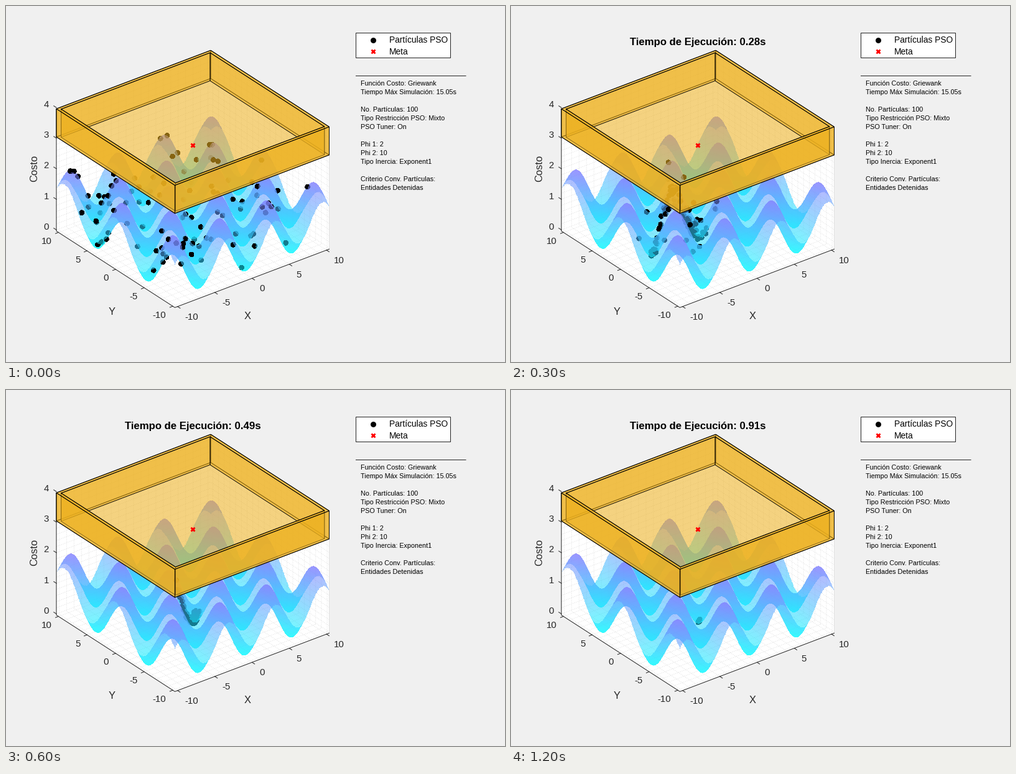
A matplotlib script that plays this animation: 802x573 px, repeating every 1300 ms.

```python
import numpy as np
import matplotlib.pyplot as plt
from matplotlib.animation import FuncAnimation
from matplotlib.collections import LineCollection

W, H, DPI = 802, 573, 64
PT = 72 / DPI  # points per pixel
FRAMES, STEP = 13, 100
LIM, WALL = 10.36, 10.0
FLOOR, Z_LOW, Z_TOP = -0.04, 3.04, 3.96
INK = "#262626"
GOLD = (237 / 255, 177 / 255, 32 / 255)
VIEW = np.array([[11.97, -9.19], [-4.54, -5.94]])  # pixels per unit of x, y
CENTRE, RISE = np.array([300.2, 374.8]), 49.2

plt.rcParams["font.family"] = "Liberation Sans"
plt.rcParams["path.snap"] = False
rng = np.random.default_rng(12)


def project(x, y, z):
    """Orthographic view in pixels, y pointing down."""
    return (CENTRE[0] + VIEW[0, 0] * x + VIEW[0, 1] * y,
            CENTRE[1] + VIEW[1, 0] * x + VIEW[1, 1] * y - RISE * z)


def unproject(px, py, z):
    """Point at height z on the sight line through a pixel."""
    inv = np.linalg.inv(VIEW)
    u, v = px - CENTRE[0], py - CENTRE[1] + RISE * z
    return inv[0, 0] * u + inv[0, 1] * v, inv[1, 0] * u + inv[1, 1] * v


def nearness(x, y, z):
    return -7.86 * x - 10.29 * y + 28.4 * z


def griewank(x, y):
    return 1 + (x**2 + y**2) / 4000 - np.cos(x) * np.cos(y / np.sqrt(2))


fig = plt.figure(figsize=(W / DPI, H / DPI), dpi=DPI, facecolor="#f0f0f0")
ax = fig.add_axes([0, 0, 1, 1])
ax.axis("off")


def text(x, y, s, size, ha="left", color=INK, **kw):
    """Text whose capitals are centred on y."""
    return ax.text(x, y + 0.36 * size, s, fontsize=size * PT, ha=ha,
                   va="baseline", color=color, zorder=8, **kw)


def line(points, color=INK, width=1.0, z=2):
    ax.plot(*zip(*points), color=color, lw=width * PT, zorder=z)


def face(points, z, fill=GOLD, alpha=0.57, edge="black"):
    ax.fill(*zip(*points), fc=(*fill, alpha), ec=edge, zorder=z,
            lw=0 if edge == "none" else 0.9 * PT, joinstyle="round")


# White axes body and dotted grid
face([project(-LIM, LIM, FLOOR), project(-LIM, -LIM, FLOOR),
      project(LIM, -LIM, FLOOR), project(LIM, -LIM, Z_TOP),
      project(LIM, LIM, Z_TOP), project(-LIM, LIM, Z_TOP)],
     0, (1, 1, 1), 1, "none")
grid = []
for t in range(-10, 11):
    grid += [(project(t, -LIM, FLOOR), project(t, LIM, FLOOR)),
             (project(-LIM, t, FLOOR), project(LIM, t, FLOOR)),
             (project(t, LIM, FLOOR), project(t, LIM, Z_TOP)),
             (project(LIM, t, FLOOR), project(LIM, t, Z_TOP))]
for t in np.arange(0, Z_TOP, 0.2):
    grid += [(project(-LIM, LIM, t), project(LIM, LIM, t)),
             (project(LIM, -LIM, t), project(LIM, LIM, t))]
ax.add_collection(LineCollection(grid, colors="0.84", linewidths=0.7 * PT,
                                 linestyles=[(0, (1.5, 2.5))], zorder=1))
line([project(LIM, -LIM, FLOOR), project(LIM, -LIM, Z_LOW)], "0.87", 0.8, 1)

# Axis lines, ticks and labels
line([project(-LIM, LIM, Z_TOP), project(-LIM, LIM, FLOOR),
      project(-LIM, -LIM, FLOOR), project(LIM, -LIM, FLOOR)])


def tick(point, step, offset, label, ha):
    x, y = point
    line([point, (x + step[0], y + step[1])])
    text(x + offset[0], y + offset[1], label, 15, ha)


for t in range(-10, 11, 5):
    tick(project(t, -LIM, FLOOR), (4.2, 2.7), (11.5, 15.6), str(t), "left")
    tick(project(-LIM, t, FLOOR), (-4.7, 1.8), (-11, 13), str(t), "right")
for t in range(5):
    tick(project(-LIM, LIM, t), (-4.2, -2.7), (-12, -5.8), str(t), "right")
text(388, 498, "X", 16.5, "center")
text(170, 491, "Y", 16.5, "center")
ax.text(45.5, 261, "Costo", fontsize=16.5 * PT, rotation=90, color=INK,
        ha="center", va="center")

# Sight lines through the surface: every crossing is a layer, far to near
X0, X1, Y0, Y1 = 74, 526, 150, 492
LAYERS, ALPHA = 12, 0.56
px, py = np.meshgrid(np.arange(X0, X1) + 0.5, np.arange(Y0, Y1) + 0.5)
near = np.full((LAYERS, *px.shape), -np.inf)
tone = np.zeros_like(near)
count = np.zeros(px.shape, int)
was_above = np.zeros(px.shape, bool)
for z in np.linspace(-0.01, 2.1, 240):
    x, y = unproject(px, py, z)
    above = z > griewank(x, y)
    inside = np.maximum(abs(x), abs(y)) <= LIM
    hit = (above != was_above) & inside & (count < LAYERS)
    slot = (count[hit], *np.nonzero(hit))
    near[slot] = nearness(x, y, z)[hit]
    tone[slot] = z / 4
    count[hit] += 1
    was_above = above

# Particles
COUNT, RADIUS = 100, 4.4
VALLEY = np.array([-2 * np.pi, 0])
start = rng.uniform(-10, 10, (COUNT, 2))
pull = rng.uniform(0.05, 0.95, (COUNT, 1))
lag = rng.uniform(0, 1, COUNT)
jitter = rng.normal(0, 1, (COUNT, 2)) * (0.7, 0.45)


def swarm(k):
    """Gather in a side valley, then cross the ridge to the centre."""
    if k < 3:
        return VALLEY + (start - VALLEY) * pull ** (k ** 1.6)
    if k == 3:
        late = lag[:, None]
        return late * swarm(2) + (1 - late) * swarm(4)
    reach = 2 * np.pi * np.exp(-0.45 * (k - 4))
    pos = jitter * np.exp(-0.35 * (k - 4)) + (0.25, 0.05)
    pos[:, 0] -= reach * lag**k
    return pos


def render(x, y):
    """Blend the surface layers that lie in front of the particles."""
    z = griewank(x, y)
    dots = np.full(px.shape, -np.inf)
    for u, v, n in zip(*project(x, y, z), nearness(x, y, z) + 3):
        disc = np.hypot(px - u, py - v) < RADIUS
        dots[disc] = np.maximum(dots[disc], n)
    rgba = np.zeros((*px.shape, 4))
    rgba[..., 3] = dots > -np.inf
    for n, c in zip(near, tone):
        layer = np.stack([c, 1 - c, np.ones_like(c), np.ones_like(c)], axis=-1)
        a = ALPHA * (n > dots)[..., None]
        rgba = rgba * (1 - a) + layer * a
    rgba[..., :3] /= np.maximum(rgba[..., 3:], 1e-6)
    return rgba.clip(0, 1)


scene = ax.imshow(np.zeros((*px.shape, 4)), extent=(X0, X1, Y1, Y0),
                  interpolation="nearest", aspect="auto", zorder=3)

# Translucent box above the surface


def ring(r, z):
    return [project(-r, r, z), project(-r, -r, z),
            project(r, -r, z), project(r, r, z)]


out_low, out_top = ring(LIM, Z_LOW), ring(LIM, Z_TOP)
in_low, in_top = ring(WALL, Z_LOW), ring(WALL, Z_TOP)


def walls(low, top, sides, z):
    for a in sides:
        b = (a + 1) % 4
        face([low[a], low[b], top[b], top[a]], z)


BACK, FRONT = (2, 3), (0, 1)
face(out_low, 4)
walls(out_low, out_top, BACK, 4.1)
walls(in_low, in_top, BACK, 4.2)
walls(in_low, in_top, FRONT, 4.3)
walls(out_low, out_top, FRONT, 4.4)
for a in range(4):
    b = (a + 1) % 4
    face([out_top[a], out_top[b], in_top[b], in_top[a]], 4.5, edge="none")
for loop in (out_top, in_top):
    line(loop + loop[:1], "black", 1, 4.6)


def cross(x, y):
    ax.plot(x, y, "x", color="red", ms=6.2 * PT, mew=2.8 * PT, zorder=9)


cross(*project(0, 0, 3.06))

# Legend and run settings
ax.fill([562.5, 714.5, 714.5, 562.5], [43.5, 43.5, 83.5, 83.5], fc="white",
        ec=INK, lw=PT, zorder=7)
ax.plot(589.5, 54.5, "o", color="black", ms=9 * PT, mew=0, zorder=9)
cross(589.5, 73)
text(616, 54.5, "Partículas PSO", 13.8, color="black")
text(616, 73.3, "Meta", 13.8, color="black")
line([(562.5, 112.5), (739, 112.5)])
NOTES = """Función Costo: Griewank
Tiempo Máx Simulación: 15.05s

No. Partículas: 100
Tipo Restricción PSO: Mixto
PSO Tuner: On

Phi 1: 2
Phi 2: 10
Tipo Inercia: Exponent1

Criterio Conv. Partículas:
Entidades Detenidas"""
for i, note in enumerate(NOTES.split("\n")):
    text(570, 124.5 + 14 * i, note, 10.7, color="black")

title = text(300.5, 56.5, "", 16.7, "center", "black", weight="bold")
ax.set_xlim(0, W)
ax.set_ylim(H, 0)


def draw(k):
    scene.set_data(render(*swarm(k).T))
    title.set_text(f"Tiempo de Ejecución: {0.07 * (k + 1):.2f}s" if k else "")
    return scene, title


anim = FuncAnimation(fig, draw, frames=FRAMES, interval=STEP, repeat=True,
                     repeat_delay=0, blit=False)
plt.show()
```
